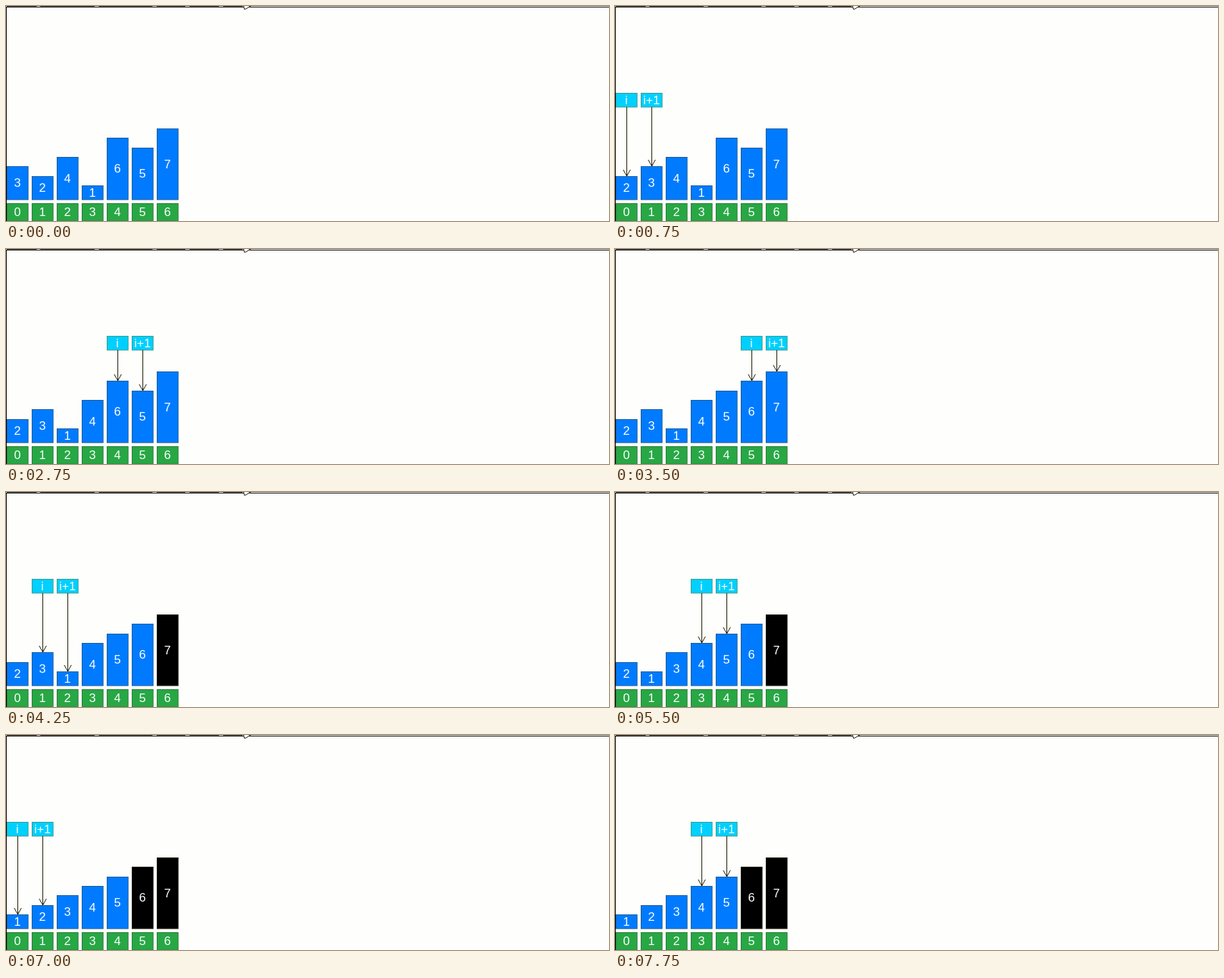
Write an HTML page with a canvas that moves like this. It is 844 by 302 pixels and loops after 8 s.

```html
<!DOCTYPE html>
<html lang="en">
<head>
<meta charset="utf-8">
<title>Bubble sort</title>
<style>
  html, body { margin: 0; width: 100%; height: 100%; overflow: hidden; background: #fefefc; }
  canvas { display: block; }
</style>
</head>
<body>
<canvas id="stage" width="844" height="302"></canvas>
<script>
const ctx = document.getElementById('stage').getContext('2d');
const STEP = 250, LOOP = 8000, PITCH = 35, BOX = 30, FLOOR = 272;
const BLUE = '#007bff', GREEN = '#28a745', CYAN = '#00d0ff', INK = '#1c1800', PAPER = '#fefefc';

// Bubble sort recorded as one state per step; a swap is held before it happens.
function record(bars) {
  const states = [];
  const save = (i, sorted) => states.push({ bars: [...bars], i, sorted });
  for (let sorted = 0; sorted < bars.length - 1; sorted++) {
    const last = bars.length - 2 - sorted;
    for (let i = 0; i <= last; i++) {
      save(states.length ? i : -1, sorted);
      if (bars[i] > bars[i + 1]) {
        save(i, sorted);
        save(i, sorted);
        [bars[i], bars[i + 1]] = [bars[i + 1], bars[i]];
        save(i, sorted);
      }
    }
    save(last, sorted + 1);
  }
  return states;
}

const states = record([3, 2, 4, 1, 6, 5, 7]);
const left = slot => 1 + slot * PITCH;
const topOf = value => Math.round(FLOOR - 20 - (value - 1) * 40 / 3);

function box(slot, top, bottom, fill, edge, label) {
  const x = left(slot);
  ctx.fillStyle = fill;
  ctx.fillRect(x, top, BOX, bottom - top);
  ctx.strokeStyle = edge;
  ctx.strokeRect(x + 0.5, top + 0.5, BOX - 0.5, bottom - top - 0.5);
  ctx.fillStyle = '#fff';
  ctx.fillText(label, x + BOX / 2, Math.floor((top + bottom) / 2) + 6);
}

function pointer(slot, label, tip) {
  box(slot, 122, 142, CYAN, '#3c9c90', label);
  const x = left(slot) + BOX / 2 + 0.5;
  ctx.strokeStyle = INK;
  ctx.beginPath();
  ctx.moveTo(x, 142);
  ctx.lineTo(x, tip);
  ctx.moveTo(x - 5, tip - 9);
  ctx.lineTo(x, tip);
  ctx.lineTo(x + 5, tip - 9);
  ctx.stroke();
}

// Stage border, with the lower edges of a button row and the mouse cursor above it.
function frameEdge() {
  ctx.fillStyle = '#000';
  ctx.fillRect(0, 1, 844, 1);
  ctx.fillRect(0, 1, 1, 301);
  ctx.fillStyle = '#5a5850';
  for (const [from, to] of [[1, 43], [48, 124], [130, 205], [211, 251], [257, 298], [304, 331]])
    ctx.fillRect(from, 0, to - from, 1);
  ctx.fillStyle = '#fff';
  ctx.strokeStyle = INK;
  ctx.beginPath();
  ctx.moveTo(332.5, -1);
  ctx.lineTo(333.5, 4.5);
  ctx.lineTo(336, 4);
  ctx.lineTo(343, -0.5);
  ctx.fill();
  ctx.stroke();
}

function draw(time) {
  const { bars, i, sorted } = states[Math.floor(time % LOOP / STEP)];
  ctx.fillStyle = PAPER;
  ctx.fillRect(0, 0, 844, 302);
  ctx.font = '17px "Liberation Sans", Arial, sans-serif';
  ctx.textAlign = 'center';
  ctx.lineWidth = 1;
  frameEdge();
  bars.forEach((value, slot) => {
    const done = slot >= bars.length - sorted;
    box(slot, topOf(value), FLOOR, done ? '#000' : BLUE, done ? '#202008' : '#1c5c98', value);
    box(slot, 277, 302, GREEN, '#2c7c38', slot);
  });
  if (i >= 0) {
    pointer(i, 'i', topOf(bars[i]));
    pointer(i + 1, 'i+1', topOf(bars[i + 1]));
  }
}

function tick() {
  draw(performance.now());
  requestAnimationFrame(tick);
}
tick();
</script>
</body>
</html>
```
